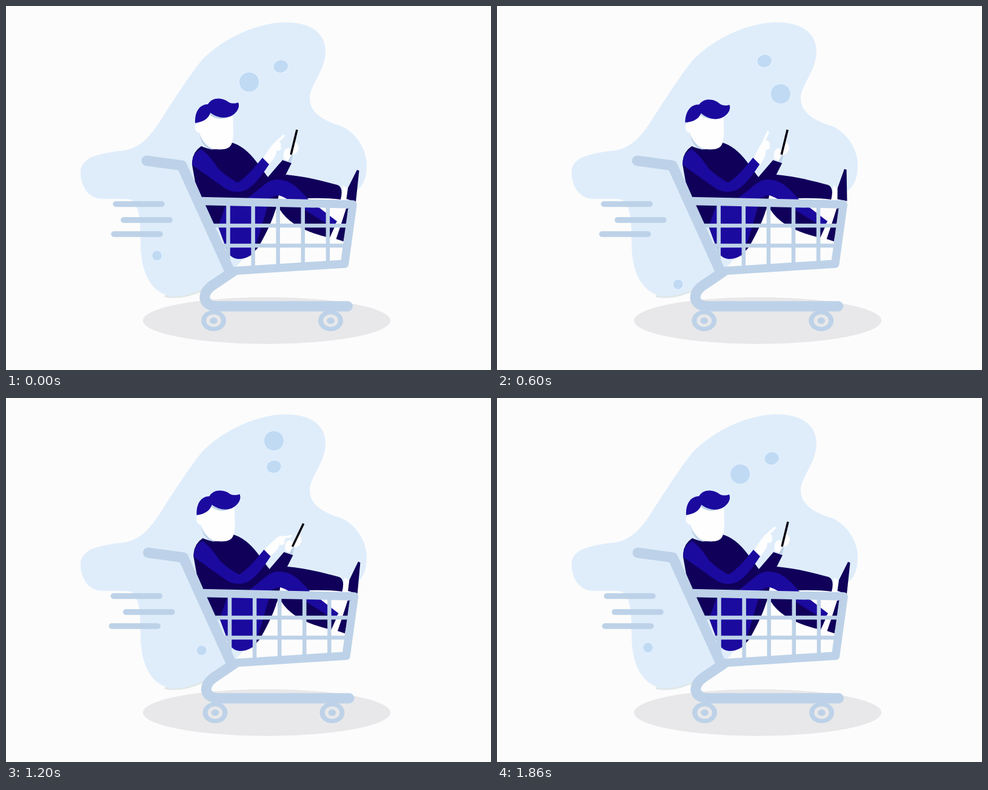
These frames come from a looping animation (800 by 600 pixels, 1.92 s). An HTML page:

```html
<!DOCTYPE html>
<html lang="en">
<head>
<meta charset="utf-8">
<title>Shopping cart ride</title>
<style>
  html, body { margin: 0; width: 100%; height: 100%; overflow: hidden; background: #fcfcfc; }
  svg { display: block; width: 800px; height: 600px; }
  .pale { fill: #bdd2e8; }
  .dark { fill: #10005a; }
  .blue { fill: #1b0a9e; }
  .skin { fill: #fefefe; }
  .back { fill: #dfedfb; }
  .floor { fill: #e8e8ea; }
  .bubble { fill: #c0daf4; stroke: #e6f2fd; }
  .bar { fill: none; stroke: #bdd2e8; stroke-linecap: round; stroke-linejoin: round; }
</style>
</head>
<body>
<svg viewBox="0 0 800 600">
  <!-- backdrop -->
  <path fill="none" stroke="#e0e8e9" stroke-width="4" d="M262 478Q294 484 332 464"/>
  <path class="back" d="M462 27C500 27 527 43 527 75S501 130 501 152C501 178 528 190 550 197S595 232 595 262
    S584 304 566 311L450 300L405 395Q385 436 330 464Q296 480 270 478C234 470 222 430 222 392
    C222 355 221 330 206 319Q196 317 160 318C138 318 123 300 123 274S155 243 195 238
    C232 232 248 198 270 165Q307 108 324 88C362 50 418 27 462 27Z"/>
  <ellipse class="floor" cx="430" cy="518.500" rx="204" ry="38.500"/>
  <circle id="big" class="bubble" r="16.500"/>
  <ellipse id="mid" class="bubble" rx="12.300" ry="10.800"/>
  <circle id="low" class="bubble" r="8.300"/>

  <!-- speed lines -->
  <g class="bar" stroke-width="9.500">
    <path id="outer" d="M181 326.500h76M178 376h76"/>
    <path id="inner" d="M194 352.800h76"/>
  </g>

  <g id="ride">
    <!-- far leg and feet -->
    <path class="skin" d="M497 316H552L556 296L565 302L566 321L497 322Z"/>
    <path class="dark" d="M440 290L462 278C495 281 525 289 547 295Q557 299 552 319Q530 316 495 317Z"/>
    <path id="shoe" class="dark" d="M579 270L582.500 271.500L577 323L561.500 318L564 300Z"/>
    <path class="skin" d="M541 357L553 364L546 386L533 382Z"/>
    <path class="dark" d="M561 334L568 332L556.500 388L544.500 384L551 365Z"/>

    <!-- torso -->
    <path class="dark" d="M322 231Q350 244 372 225Q394 231 414 258L432 282L456 254L471 259L461 279
      L452 300L446 333L414 395L365 370L328 327L312 290L307 262Q306 242 322 231Z"/>
    <path class="back" d="M434 261L455 255L429 279Z"/>

    <!-- near leg -->
    <path class="dark" d="M440 318L452 336Q472 368 534 382L543 362L500 320Z"/>
    <path class="blue" d="M395 319C420 302 432 285 447 286C470 286 482 300 498 318L546 355L540 364
      C510 350 470 318 450 312Q439 311 434 322L425 352L411 400Q404 417 383 417Q370 416 364 402L350 364L362 322Z"/>
    <path class="dark" d="M436 314L446 330Q440 356 416 398L402 413Q418 384 426 352Z"/>
    <path class="dark" d="M320 312L366 318L350 364L340 358Z"/>

    <!-- head -->
    <path class="pale" d="M319 205Q320 232 340 237L350 220Z"/>
    <path class="skin" d="M318 185L340 165L374 172L375 205C375 228 371 234 360 236Q340 238 332 230
      Q322 221 319 209C311 208 309 196 315 193Z"/>
    <path class="pale" d="M334 174L374 178Q354 194 334 178Z"/>
    <path id="hair" class="blue" d="M312 193C311 172 321 162 333 162C340 150 357 150 368 159Q375 162 383 159
      C387 168 379 178 370 182Q354 188 337 176Q333 190 312 193Z"/>

    <!-- hand with the phone -->
    <path class="pale" d="M464 242L475 240L470 258L462 256Z"/>
    <path class="skin" d="M458 251Q456 235 467 234L472 243L465 256Z"/>
    <g id="phone">
      <path class="skin" d="M468 247L475 222Q487 230 480 241Q477 245 468 247Z"/>
      <path stroke="#05010f" stroke-width="3.500" d="M470 245L480 204"/>
    </g>

    <!-- tapping hand -->
    <g id="hand">
      <path class="skin" d="M424 251Q435 233 442 226C449 221 456 225 453 232Q456 239 446 239Q446 249 433 262Z"/>
      <path id="finger" fill="none" stroke="#fefefe" stroke-width="4" stroke-linecap="round" d="M442 229L458 214"/>
    </g>
    <path class="blue" d="M322 236Q336 246 350 268Q366 283 382 291Q396 284 423 250L434 261
      Q410 298 394 304Q378 310 362 301L307 262Q307 242 322 236Z"/>

    <!-- cart -->
    <g class="bar">
      <path stroke-width="17" d="M232 255L290 263L369 437"/>
      <path stroke-width="13.500" d="M320 321.500L572 327L558.500 425L370 437"/>
      <path stroke-width="17" d="M374 438L340 461C320 475 326 495 348 495H563.500"/>
      <path id="grid" stroke-width="6.500" stroke-linecap="butt"/>
    </g>
    <g id="wheels"></g>
  </g>
</svg>
<script>
const FRAME = 60, SPAN = 1860, LOOP = 1920, TURN = 2 * Math.PI;
const el = id => document.getElementById(id);
const put = (id, value) => el(id).setAttribute('transform', value);

let grid = 'M342 362H566M356 395H562';
for (let i = 0; i < 5; i++) grid += `M${366.5 + 41.1 * i} 325V${430 - 2 * i}`;
el('grid').setAttribute('d', grid);

const ring = (x, size, name) =>
  `<ellipse class="${name}" cx="${x}" cy="518.700" rx="${20.5 * size}" ry="${17.3 * size}"/>`;
el('wheels').innerHTML = [342.5, 535.5].map(x =>
  ring(x, 1, 'pale') + ring(x, 0.6, 'floor') + ring(x, 0.31, 'pale')).join('');

// Keys are [time, value], joined with a sine ease.
function ease(keys, t) {
  const i = Math.max(1, keys.findIndex(key => key[0] > t));
  const [t0, a] = keys[i - 1], [t1, b] = keys[i];
  return a + (b - a) * (1 - Math.cos(Math.PI * (t - t0) / (t1 - t0))) / 2;
}

// The cart rocks forward twice and settles.
const swing = (hi, lo, t) => ease([[0, 0], [300, hi], [700, lo], [1020, hi], [1400, lo], [SPAN, 0]], t);

// Raise the finger, rest, tap the phone.
const tap = [[0, 0], [240, -17], [600, -8], [840, -8], [1290, 14], [SPAN, 0]];

// Elliptic path; warp makes part of the turn faster.
function orbit(cx, cy, rx, ry, start, turn, warp = 0, lag = 0) {
  const a = start - turn - warp * Math.cos(turn - lag);
  return `translate(${cx + rx * Math.cos(a)} ${cy + ry * Math.sin(a)})`;
}

function draw() {
  const t = Math.floor(performance.now() % LOOP / FRAME) * FRAME % SPAN;
  const turn = TURN * t / SPAN;
  const slide = 3 - 3 * Math.cos(2 * turn);
  const reach = ease(tap, t);

  put('outer', `translate(${-slide})`);
  put('inner', `translate(${slide})`);
  put('big', orbit(441, 112.5, 42, 42, 2.74, turn, 0.245, 4.34));
  put('mid', orbit(445.6, 101.5, 7.7, 13.4, -0.15, turn) + ' rotate(-12)');
  put('low', orbit(284.5, 428, 41, 33, -2.74, turn, 0.3, 2));

  put('ride', `translate(${swing(6.3, -2, t)})`);
  put('hair', `rotate(${swing(-5.5, 5.5, t)} 325 180)`);
  put('shoe', `rotate(${swing(6.5, -9.5, t)} 566 312)`);
  put('hand', `rotate(${reach} 433 252)`);
  put('finger', `rotate(${1.8 * reach} 442 229)`);
  put('phone', `rotate(${Math.max(0, reach)} 470 245)`);
  requestAnimationFrame(draw);
}
draw();
</script>
</body>
</html>
```
